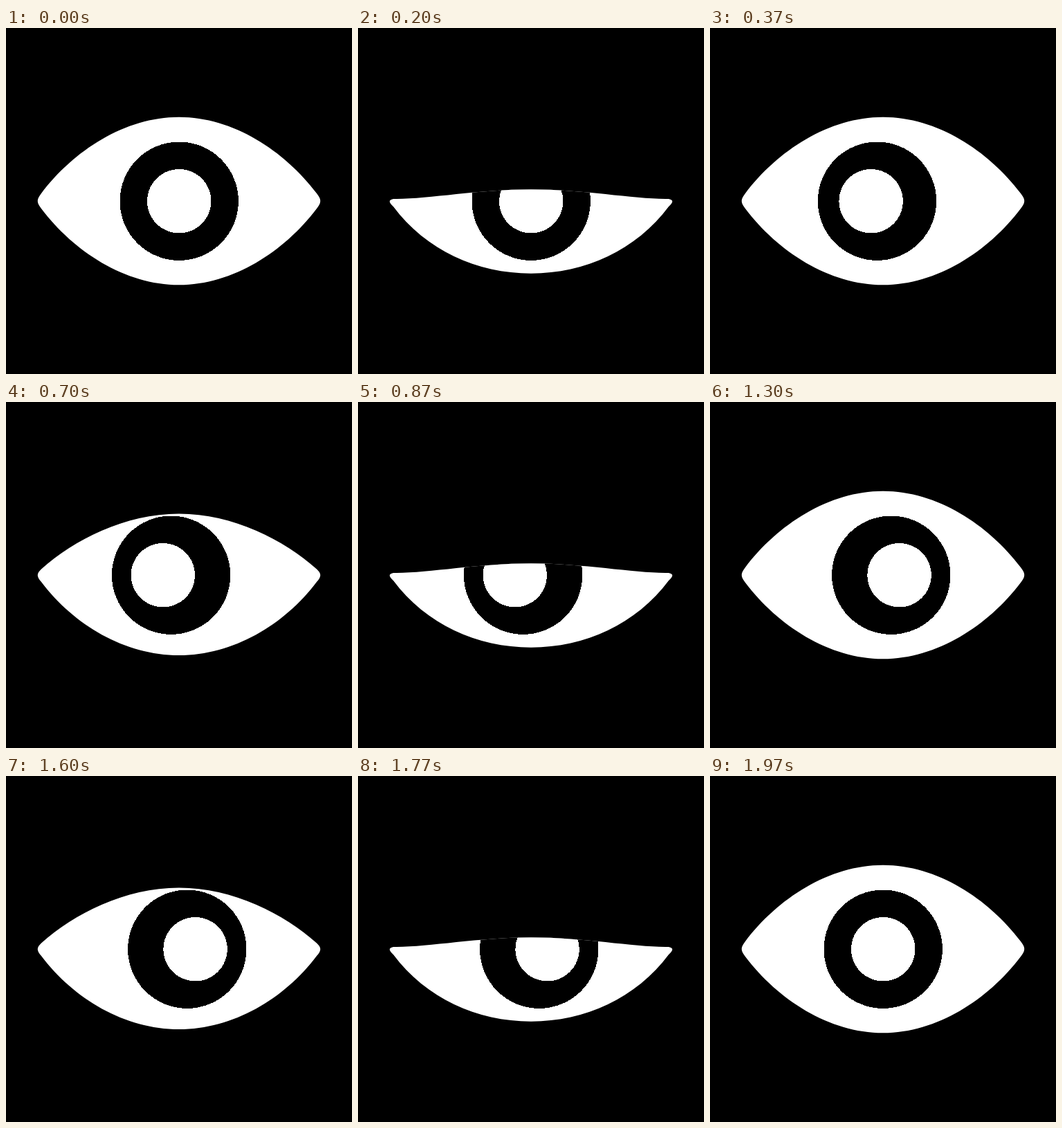
An HTML page that plays this animation: 500x500 px, repeating every 2.01 s.

```html
<!DOCTYPE html>
<html lang="en">
<head>
<meta charset="utf-8">
<title>Blinking eye</title>
<style>
html, body { margin: 0; width: 100%; height: 100%; overflow: hidden; background: #000; }
svg { display: block; width: 100vw; height: 100vh; }
</style>
</head>
<body>
<svg viewBox="0 0 500 500" fill="#fff" shape-rendering="crispEdges">
  <clipPath id="lids"><path id="lidShape"/></clipPath>
  <g clip-path="url(#lids)">
    <rect width="500" height="500"/>
    <circle id="iris" r="85.7" fill="#000"/>
    <circle id="pupil" r="46.2"/>
  </g>
</svg>
<script>
const LOOP = 2010;
const BLINKS = [0, 20, 47];   // start ticks, 30 ticks per second
const BLINK_HALF = 4, GAZE_TICKS = 4;
const GAZES = [[8, -1, 0], [28, 0, -1], [35, 1, 0], [55, 0, 0]];   // start tick, x, y
const [lidShape, iris, pupil] = ['lidShape', 'iris', 'pupil'].map(id => document.getElementById(id));

const clamp = v => Math.max(0, Math.min(1, v));
const mix = (a, b, p) => a + (b - a) * p;
const smooth = p => p * p * (3 - 2 * p);

function closure(tick) {
  return Math.max(...BLINKS.map(start =>
    smooth(clamp(1 - Math.abs(tick - start - BLINK_HALF) / BLINK_HALF))));
}

function gaze(tick) {
  let x = 0, y = 0;
  for (const [start, toX, toY] of GAZES) {
    const p = clamp((tick - start) / GAZE_TICKS);
    x = mix(x, toX, p);
    y = mix(y, toY, p);
  }
  return [x, y];
}

// Both lids meet on the same curve when closed.
function eyePath(shut) {
  const lid = side => [
    mix(250 + side * 2, 250, shut),
    mix(250 + side * 11, 255, shut),
    mix(250 + side * 73, 319, shut),
    mix(250 + side * 121.3, 338, shut)
  ];
  const [t0, t1, t2, t3] = lid(-1), [b0, b1, b2, b3] = lid(1);
  return `M51 ${t1}C98 ${t2} 172 ${t3} 250 ${t3}S402 ${t2} 449 ${t1}` +
    `C456 ${t0} 456 ${b0} 449 ${b1}C402 ${b2} 328 ${b3} 250 ${b3}` +
    `S98 ${b2} 51 ${b1}C44 ${b0} 44 ${t0} 51 ${t1}Z`;
}

function place(circle, x, y, reach) {
  circle.setAttribute('cx', 250.2 + x * reach);
  circle.setAttribute('cy', 250.2 + y * reach);
}

function draw(ms) {
  let tick = Math.min(59, Math.floor((Math.floor(ms / 10) * 10 + 3.4) * 0.03));
  if (tick < 2) tick = 0;   // the eye rests briefly before the first blink
  const [x, y] = gaze(tick);
  lidShape.setAttribute('d', eyePath(closure(tick)));
  place(iris, x, y, 11.6);
  place(pupil, x, y, 23.4);
}

const begin = performance.now();
function loop() {
  draw((performance.now() - begin) % LOOP);
  requestAnimationFrame(loop);
}
loop();
</script>
</body>
</html>
```
